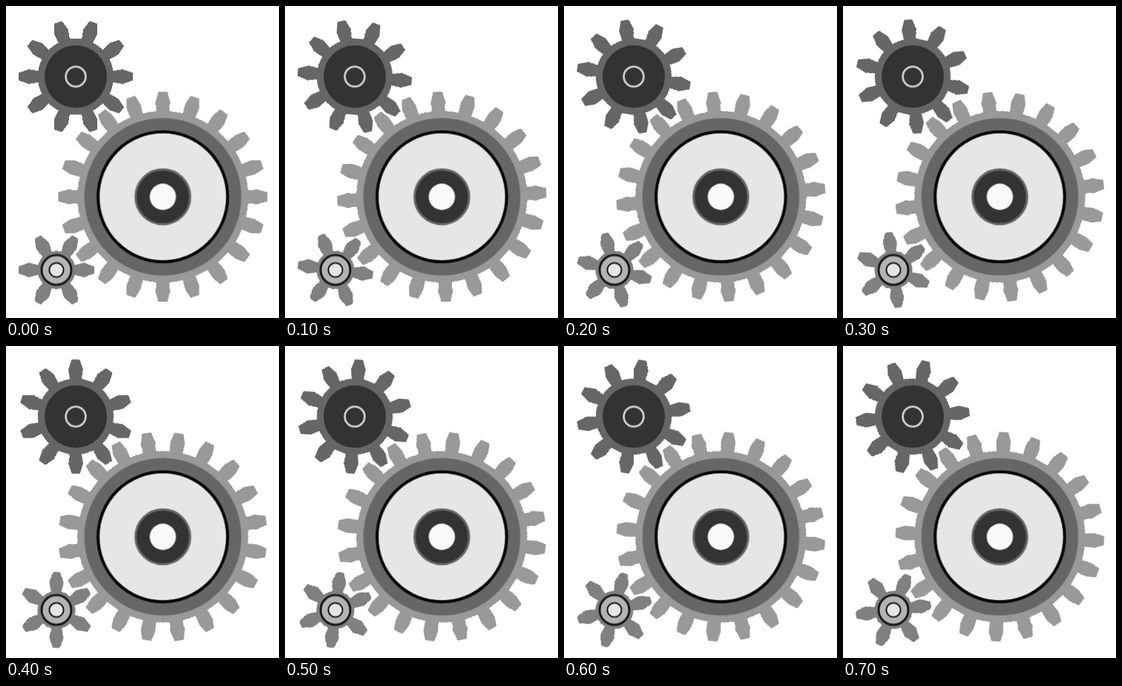
Write an HTML page that moves like this. It is 368 px wide and 419 px high and loops after 0.8 s.

```html
<!DOCTYPE html>
<html lang="en">
<head>
<meta charset="utf-8">
<title>Gears</title>
<style>
  html, body { margin: 0; width: 100%; height: 100%; overflow: hidden; background: #fff; }
  svg { display: block; width: 368px; height: 419px; }
</style>
</head>
<body>
<svg id="stage" viewBox="0 0 368 419"></svg>
<script>
const LOOP = 800, STEPS = 8;
const MODULE = 12.8; // tooth height above and below the pitch circle
const stage = document.getElementById('stage');

// discs: [radius, fill, stroke, stroke width]
const gears = [
  { x: 211.4, y: 256.2, teeth: 20, dir: -1, color: '#999', tip: 6.2, root: 8.9,
    discs: [[105.8, '#666'], [87.3, '#e6e6e6', '#000', 4],
            [36.8, '#333', '#666', 3], [17.7, '#f9f9f9']] },
  { x: 94, y: 94.8, teeth: 10, dir: 1, color: '#666', tip: 5.3, root: 7.9,
    discs: [[42, '#333'], [13.4, '#333', '#ccc', 2.8]] },
  { x: 68, y: 354.5, teeth: 6, dir: 1, color: '#808080', tip: 4.6, root: 6.8,
    discs: [[20, '#b3b3b3', '#1a1a1a', 3], [9.6, '#e6e6e6', '#1a1a1a', 2]] }
];

function add(parent, tag, attrs) {
  const el = document.createElementNS('http://www.w3.org/2000/svg', tag);
  for (const key in attrs) el.setAttribute(key, attrs[key]);
  return parent.appendChild(el);
}

function gearPath({ teeth, tip, root }) {
  const pitchR = teeth * MODULE / 2;
  const rootR = pitchR - MODULE, tipR = pitchR + MODULE;
  const flank = [[rootR, root], [pitchR, 9.8], [tipR, tip]];
  const side = [
    ...flank.map(([r, half]) => [r, -Math.asin(half / r)]),
    ...flank.reverse().map(([r, half]) => [r, Math.asin(half / r)])
  ];
  let d = '';
  for (let i = 0; i < teeth; i++) {
    side.forEach(([r, offset], k) => {
      const a = i * 2 * Math.PI / teeth + offset;
      const point = (r * Math.cos(a)).toFixed(2) + ' ' + (r * Math.sin(a)).toFixed(2);
      if (k) d += 'L' + point;
      else d += i ? `A${rootR} ${rootR} 0 0 1 ${point}` : 'M' + point;
    });
  }
  const [r, offset] = side[0];
  return d + `A${rootR} ${rootR} 0 0 1 ${r * Math.cos(offset)} ${r * Math.sin(offset)}Z`;
}

for (const gear of gears) {
  const group = add(stage, 'g', { transform: `translate(${gear.x} ${gear.y})` });
  const wheel = add(group, 'path', {
    d: gearPath(gear), fill: gear.color, 'shape-rendering': 'crispEdges'
  });
  for (const [r, fill, stroke = 'none', width = 0] of gear.discs) {
    add(group, 'circle', { r, fill, stroke, 'stroke-width': width });
  }
  // one tooth pitch per loop
  wheel.animate(
    [{ transform: 'rotate(0deg)' }, { transform: `rotate(${gear.dir * 360 / gear.teeth}deg)` }],
    { duration: LOOP, iterations: Infinity, easing: `steps(${STEPS}, end)` }
  );
}
</script>
</body>
</html>
```
